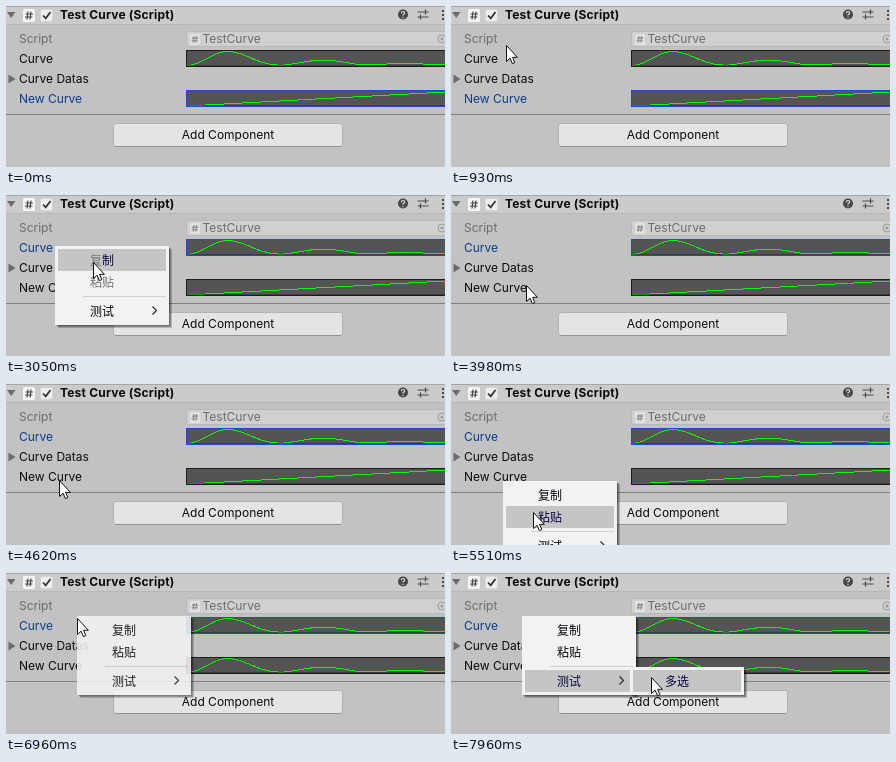
Animation of 439 by 161 pixels, one loop 8000 ms. Source, as an HTML page:

```html
<!DOCTYPE html>
<html lang="en">
<head>
<meta charset="utf-8">
<title>Curve inspector</title>
<style>
  html, body { margin: 0; width: 100%; height: 100%; overflow: hidden; background: #c2c2c2; }
  svg { display: block; width: 439px; height: 161px; }
  text { font: 12px Inter, sans-serif; fill: #0b0b0b; white-space: pre; }
  .head { font-weight: 700; letter-spacing: .2px; }
  .dim { fill: #6c6c6c; }
  .zh { font: 12px "Noto Sans CJK SC", "Noto Sans CJK", sans-serif; fill: #08080f; }
  .zh.hot { fill: #06083f; }
  .zh.off { fill: #757575; }
  .label.on { fill: #0a3c8c; }
  .edge { fill: none; stroke: #1c1c1c; }
  .edge.on { stroke: #1f48d8; }
  .wave { fill: none; stroke: #0f0; shape-rendering: crispEdges; }
</style>
</head>
<body>
<svg id="stage" viewBox="0 0 439 161" xmlns="http://www.w3.org/2000/svg"></svg>
<script>
const LOOP = 8000;
const SELECT_AT = 1190, PASTE_AT = 5920;
const MENU_W = 114, MENU_H = 79, SUB_H = 28;
const ROWS = [3, 25, 54];
const NAMES = ['复制', '粘贴', '测试'];

const MENUS = [
  { x: 49, y: 51, from: 2000, to: 3080, off: true },
  { x: 52, y: 97, from: 5000, to: 5850 },
  { x: 71, y: 43, from: 6830, to: LOOP + 500 }
];
const SUB = { x: 179, y: 94, from: 7440, to: LOOP + 500 };

// Pointer path: time, x, y
const PATH = [
  [340, 200, 139], [560, 150, 100], [800, 85, 60], [960, 53, 39], [1140, 62, 46],
  [1390, 62, 46], [1530, 40, 42], [1640, 54, 49], [1750, 50, 51],
  [2400, 50, 51], [2770, 87, 68], [3250, 87, 68], [3550, 83, 78],
  [3670, 83, 78], [3810, 71, 89], [3950, 71, 89], [4140, 150, 128],
  [4260, 186, 142], [4400, 110, 130], [4530, 42, 104], [4620, 53, 97],
  [5370, 53, 97], [5510, 82, 129], [5590, 82, 131], [6050, 82, 131],
  [6400, 70, 80], [6630, 61, 44], [6700, 60, 33], [6860, 71, 46],
  [6990, 71, 46], [7320, 94, 102], [7440, 94, 102], [7600, 106, 104],
  [7870, 106, 104], [7960, 200, 105], [LOOP, 200, 105]
];

const clamp = v => Math.max(0, Math.min(1, v));
const $ = id => document.getElementById(id);
const rect = (x, y, w, h, fill, more = '') =>
  `<rect x="${x}" y="${y}" width="${w}" height="${h}" fill="${fill}" ${more}/>`;
const text = (x, y, s, cls = '', id = '') =>
  `<text x="${x}" y="${y}" class="${cls}" ${id && `id="${id}"`}>${s}</text>`;
const hash = (x, y, s, color) =>
  `<path transform="translate(${x} ${y}) scale(${s})" d="M3 0L2 8M6 0L5 8M.6 2.5H8M0 5.5H7.4" fill="none" stroke="${color}" stroke-width="1.2"/>`;

const BUMPS = 'M181 59.5C198 59 205 45.5 221.5 45.5C240 45.5 250 59 274 59.2' +
  'C290 59 300 54 317 54C335 54 345 59 361 59C375 59 385 57.2 397 57.2C412 57.2 425 59 440 59';
const RAMP = 'M181 100L440 86';

function field(y, id, d) {
  return rect(180, y, 270, 17, '#545454') +
    `<path id="${id}Wave" class="wave" d="${d}"/>` +
    rect(180, y + 15.5, 270, 1, '#262626') +
    `<rect id="${id}Edge" class="edge" x="180.5" y="${y + 0.5}" width="270" height="16"/>`;
}

function header() {
  return rect(0, 0, 439, 19, '#cbcbcb') + rect(0, 0, 439, 1, '#a6a6a6') + rect(0, 18, 439, 1, '#b7b7b7') +
    '<path d="M1 6H9.5L5.2 12Z" fill="#6c6c6c"/>' +
    rect(17, 3, 12, 13, '#f6f6f6', 'rx="1.5"') + hash(19, 5.5, 1, '#444') +
    rect(34.5, 3.5, 12, 12, '#efefef', 'rx="2" stroke="#d6d6d6"') +
    '<path d="M37 9.5L39.7 12.3L44.5 6" fill="none" stroke="#333" stroke-width="1.8"/>' +
    text(54, 13, 'Test Curve (Script)', 'head') +
    '<circle cx="397" cy="8.5" r="5" fill="#474747"/>' +
    '<path d="M395.3 7.2Q395.4 5.5 397 5.5T398.7 7.1Q398.6 8 397 8.7V9.6M397 10.8V12" fill="none" stroke="#e6e6e6" stroke-width="1.1"/>' +
    '<path d="M411.5 6H422.5M411.5 11H422.5M419.5 3.5V8.5M414.5 8.5V13.5" fill="none" stroke="#4a4a4a" stroke-width="1.2"/>' +
    [4, 8, 12].map(y => rect(436, y, 2, 2, '#4a4a4a')).join('');
}

function body() {
  return text(13, 37, 'Script', 'dim') +
    rect(180.5, 25.5, 270, 15, '#d0d0d0', 'rx="2" stroke="#b8b8b8"') +
    rect(184, 28, 10, 11, '#e2e2e2', 'rx="1"') + hash(185.5, 30, 0.85, '#888') +
    text(196.5, 37, 'TestCurve', 'dim') +
    '<circle cx="436" cy="33" r="4" fill="none" stroke="#9b9b9b"/><circle cx="436" cy="33" r="1.5" fill="#9b9b9b"/>' +
    text(13, 57, 'Curve', 'label', 'topLabel') + field(44, 'top', BUMPS) +
    '<path d="M2.5 68.5V77.5L9.5 73Z" fill="#6c6c6c"/>' + text(13, 77, 'Curve Datas') +
    text(13, 97, 'New Curve', 'label', 'newLabel') + field(84, 'new', RAMP) +
    rect(0, 108, 439, 1, '#808080') +
    rect(107.5, 117.5, 229, 23, '#e4e4e4', 'rx="2.5" stroke="#b2b2b2"') +
    rect(109, 140, 226, 1, '#939393') +
    '<text x="222" y="133" text-anchor="middle">Add Component</text>';
}

function panel(h) {
  return [3, 2, 1].map(d => rect(d, d, MENU_W, h, '#000', 'opacity=".22" rx="1"')).join('') +
    rect(0, 0, MENU_W, h, '#f2f2f2');
}

function row(y, name, id) {
  return rect(3, y, MENU_W - 6, 22, '#c5c5c5', `id="${id}Bar"`) + text(35, y + 15.5, name, 'zh', id);
}

$('stage').innerHTML = rect(0, 0, 439, 161, '#c2c2c2') + header() + body() +
  `<g id="menu">${panel(MENU_H)}${NAMES.map((n, i) => row(ROWS[i], n, 'row' + i)).join('')}` +
  rect(28, 50, 83, 1, '#cfcfcf') +
  '<path d="M97.5 60.5L101.5 64.5L97.5 68.5" fill="none" stroke="#222" stroke-width="1.1"/></g>' +
  `<g id="sub">${panel(SUB_H)}${row(3, '多选', 'pick')}</g>` +
  '<path id="pointer" d="M.5 -.5V15.5L4.1 12.2L6.4 17.6L8.8 16.6L6.6 11.3H11.4Z" fill="#fff" stroke="#111" stroke-linejoin="round"/>';

function slope(i, k) {
  const a = PATH[i - 1], b = PATH[i], c = PATH[i + 1];
  if (!a || !c) return 0;
  const before = b[k] - a[k], after = c[k] - b[k];
  return before * after <= 0 ? 0 : (before + after) / (c[0] - a[0]);
}

function pointerAt(t) {
  let i = 0;
  while (i < PATH.length - 2 && t >= PATH[i + 1][0]) i++;
  const a = PATH[i], b = PATH[i + 1], d = b[0] - a[0], u = clamp((t - a[0]) / d);
  const ease = u * u * (3 - 2 * u);
  return [1, 2].map(k => a[k] + (b[k] - a[k]) * ease +
    d * u * (1 - u) * ((1 - u) * slope(i, k) - u * slope(i + 1, k)));
}

const fade = (m, t) => clamp((t - m.from) / 150) * clamp(1 - (t - m.to) / 170);

function place(id, m, t) {
  const o = m ? fade(m, t) : 0;
  $(id).style.display = o ? '' : 'none';
  if (o) {
    $(id).setAttribute('opacity', o);
    $(id).setAttribute('transform', `translate(${m.x} ${m.y})`);
  }
}

function setRow(id, hot, off) {
  $(id + 'Bar').style.display = hot ? '' : 'none';
  $(id).setAttribute('class', 'zh' + (off ? ' off' : hot ? ' hot' : ''));
}

function draw(t) {
  const [x, y] = pointerAt(t);
  const topOn = t >= SELECT_AT;
  for (const [id, on] of [['top', topOn], ['new', !topOn]]) {
    $(id + 'Label').classList.toggle('on', on);
    $(id + 'Edge').classList.toggle('on', on);
  }
  const pasted = t >= PASTE_AT;
  $('newWave').setAttribute('d', pasted ? BUMPS : RAMP);
  $('newWave').setAttribute('transform', pasted ? 'translate(0 40)' : '');

  const m = MENUS.find(n => fade(n, t) > 0);
  place('menu', m, t);
  place('sub', SUB, t);
  if (m) {
    const inside = x > m.x + 3 && x < m.x + MENU_W;
    const subOpen = t > SUB.from;
    ROWS.forEach((top, i) => {
      const over = inside && y >= m.y + top && y < m.y + top + 22;
      setRow('row' + i, subOpen ? i === 2 : over, i === 1 && m.off);
    });
    const pressed = m.off && t >= 3000;
    $('row0').innerHTML = pressed ? '<tspan fill="#777">复</tspan>制' : '复制';
  }
  setRow('pick', x > SUB.x + 3);

  $('pointer').style.display = t < PATH[0][0] ? 'none' : '';
  $('pointer').setAttribute('transform', `translate(${Math.round(x)} ${Math.round(y)})`);
}

const start = performance.now();
function tick() {
  draw((performance.now() - start) % LOOP);
  requestAnimationFrame(tick);
}
tick();
</script>
</body>
</html>
```
